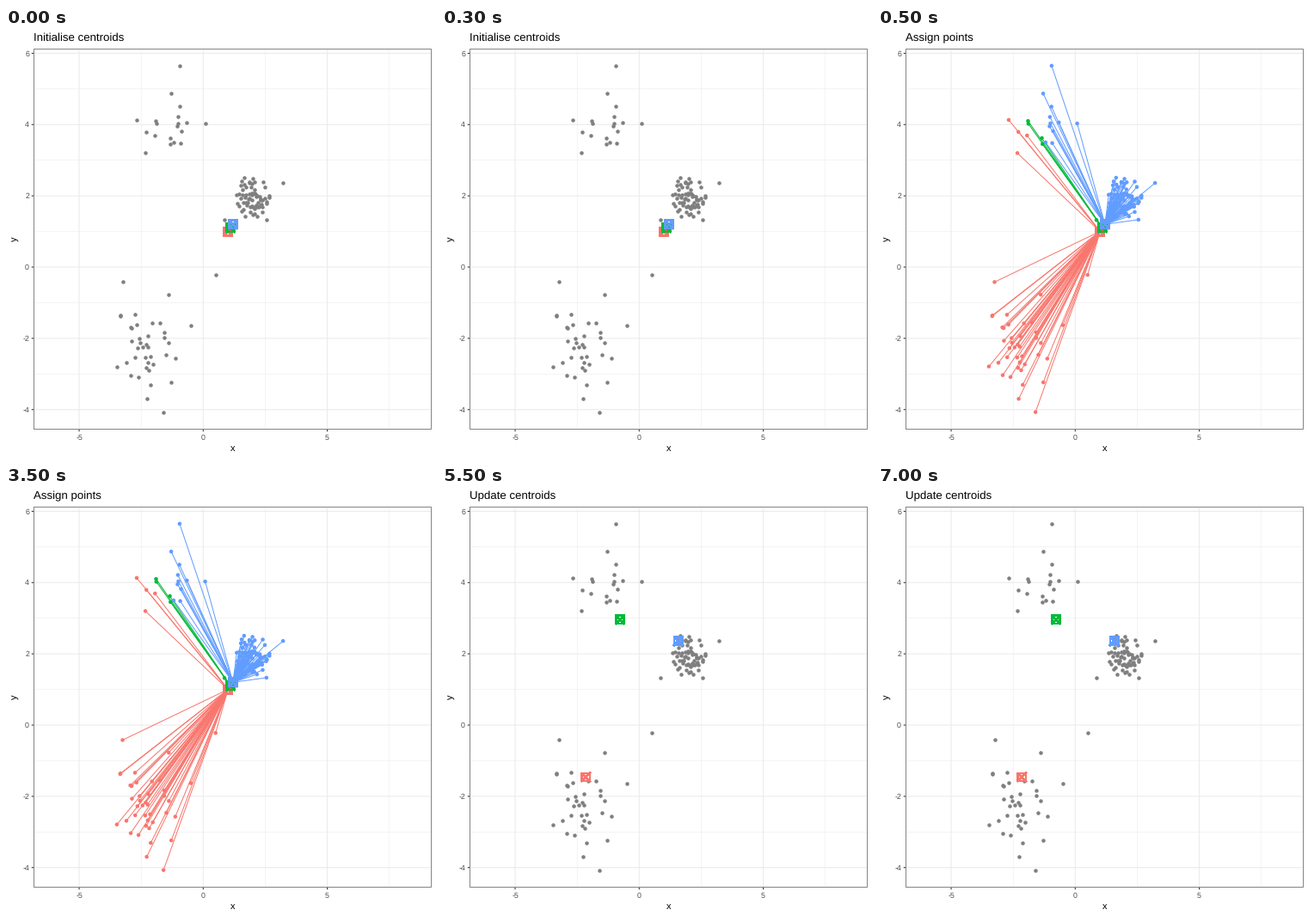
Animation of 500 by 500 pixels, one loop 8 s. Source, as a matplotlib script:

```python
import numpy as np
import matplotlib.pyplot as plt
from matplotlib.animation import FuncAnimation
from matplotlib.collections import LineCollection

plt.rcParams["text.hinting"] = "none"

SIZE, PX = 500, 0.72          # stage side, points per pixel
LEFT, TOP, RIGHT, BOTTOM = 32.5, 24.5, 494.5, 466.5
COLORS = np.array(["#F8766D", "#00BA38", "#619CFF"])
GREY, GRID, TICK = "#7F7F7F", "#EBEBEB", "#333333"


def to_px(xy):
    """Plot units to stage pixels."""
    return np.array([229.3, 278]) + np.asarray(xy) * [28.85, -41.43]


def cluster(rng, n, mean, sd):
    """Normal cloud without its far tails."""
    z = rng.normal(size=(n * 4, 2))
    z = z[np.hypot(*z.T) < 2.1][:n]
    return mean + z * sd


rng = np.random.default_rng(7)
edge = [(-0.95, 5.65), (-1.29, 4.87), (-2.68, 4.13), (-1.9, 4.1),
        (-2.33, 3.2), (0.08, 4.03), (0.86, 1.32), (3.22, 2.36),
        (2.55, 1.33), (0.5, -0.22), (-3.25, -0.42), (-3.48, -2.79),
        (-1.6, -4.07), (-0.5, -1.63)]
data = np.vstack([edge,
                  cluster(rng, 13, (-1.0, 3.9), (0.7, 0.45)),
                  cluster(rng, 35, (-2.2, -2.0), (0.65, 0.85)),
                  cluster(rng, 66, (2.0, 2.05), (0.36, 0.33))])
points = to_px(data)

# The starting centroids lie on a diagonal, so x + y decides the nearest
group = np.digitize(data.sum(axis=1), [2.1, 2.3])
start = to_px([(1 + k / 10, 1 + k / 10) for k in range(3)])
updated = to_px([(-2.15, -1.46), (-0.77, 2.96), (1.57, 2.36)])

fig = plt.figure(figsize=(5, 5), dpi=100, facecolor="white")
ax = fig.add_axes([0, 0, 1, 1])
ax.set_xlim(0, SIZE)
ax.set_ylim(SIZE, 0)
ax.axis("off")


def line(xs, ys, color, width=1.07, z=1):
    ax.plot(xs, ys, color=color, lw=width * PX, zorder=z, snap=False,
            solid_capstyle="butt")


def label(x, y, text, size, color="black", **kw):
    return ax.text(x, y, text, fontsize=size * PX, color=color,
                   family="Liberation Sans", **kw)


# Grid, ticks and tick labels
for v in np.arange(-5, 8, 2.5):
    x = to_px((v, 0))[0]
    major = v % 5 == 0
    line([x, x], [TOP, BOTTOM], GRID, 1.07 if major else 0.53)
    if major:
        line([x, x], [BOTTOM, BOTTOM + 2.75], TICK)
        label(x, 479, f"{v:.0f}", 8.8, "#4D4D4D", ha="center", va="baseline")
for v in range(-4, 7):
    y = to_px((0, v))[1]
    major = v % 2 == 0
    line([LEFT, RIGHT], [y, y], GRID, 1.07 if major else 0.53)
    if major:
        line([LEFT - 2.75, LEFT], [y, y], TICK)
        label(27, y + 3.2, f"{v}", 8.8, "#4D4D4D", ha="right", va="baseline")

line([LEFT, RIGHT, RIGHT, LEFT, LEFT], [TOP, TOP, BOTTOM, BOTTOM, TOP],
     "#858585", 1, 2)
label(263.5, 492, "x", 11, ha="center", va="baseline")
label(10.5, 245, "y", 11, ha="center", va="center", rotation=90)
title = label(32, 15, "", 13.2, va="baseline")

# Links from each point to its centroid, drawn colour by colour
order = np.argsort(group, kind="stable")
links = LineCollection([[points[i], start[group[i]]] for i in order],
                       colors=COLORS[group[order]], linewidths=PX, zorder=3)
ax.add_collection(links)
dots = ax.scatter(*points.T, s=(4.5 * PX) ** 2, c=GREY, linewidths=0,
                  zorder=4, snap=False)

# Crossed squares for the centroids
corners = np.array([(-1, -1), (1, -1), (1, 1), (-1, 1), (-1, -1),
                    (1, 1), (np.nan, np.nan), (-1, 1), (1, -1)])
box = 4.6 * corners
marks = [ax.plot([], [], color=c, lw=1.7 * PX, zorder=5 + k, snap=False,
                 solid_joinstyle="miter", antialiased=False)[0]
         for k, c in enumerate(COLORS)]

STEPS = [("Initialise centroids", start), ("Assign points", start),
         ("Update centroids", updated)]


def draw(i):
    step = 0 if i < 1 else 1 if i < 11 else 2
    text, centres = STEPS[step]
    title.set_text(text)
    links.set_visible(step == 1)
    dots.set_facecolor(COLORS[group] if step == 1 else GREY)
    for mark, centre in zip(marks, centres):
        mark.set_data(*(box + centre).T)
    return [title, links, dots, *marks]


anim = FuncAnimation(fig, draw, frames=16, interval=500, repeat=True,
                     repeat_delay=0, init_func=lambda: draw(0))
plt.show()
```
